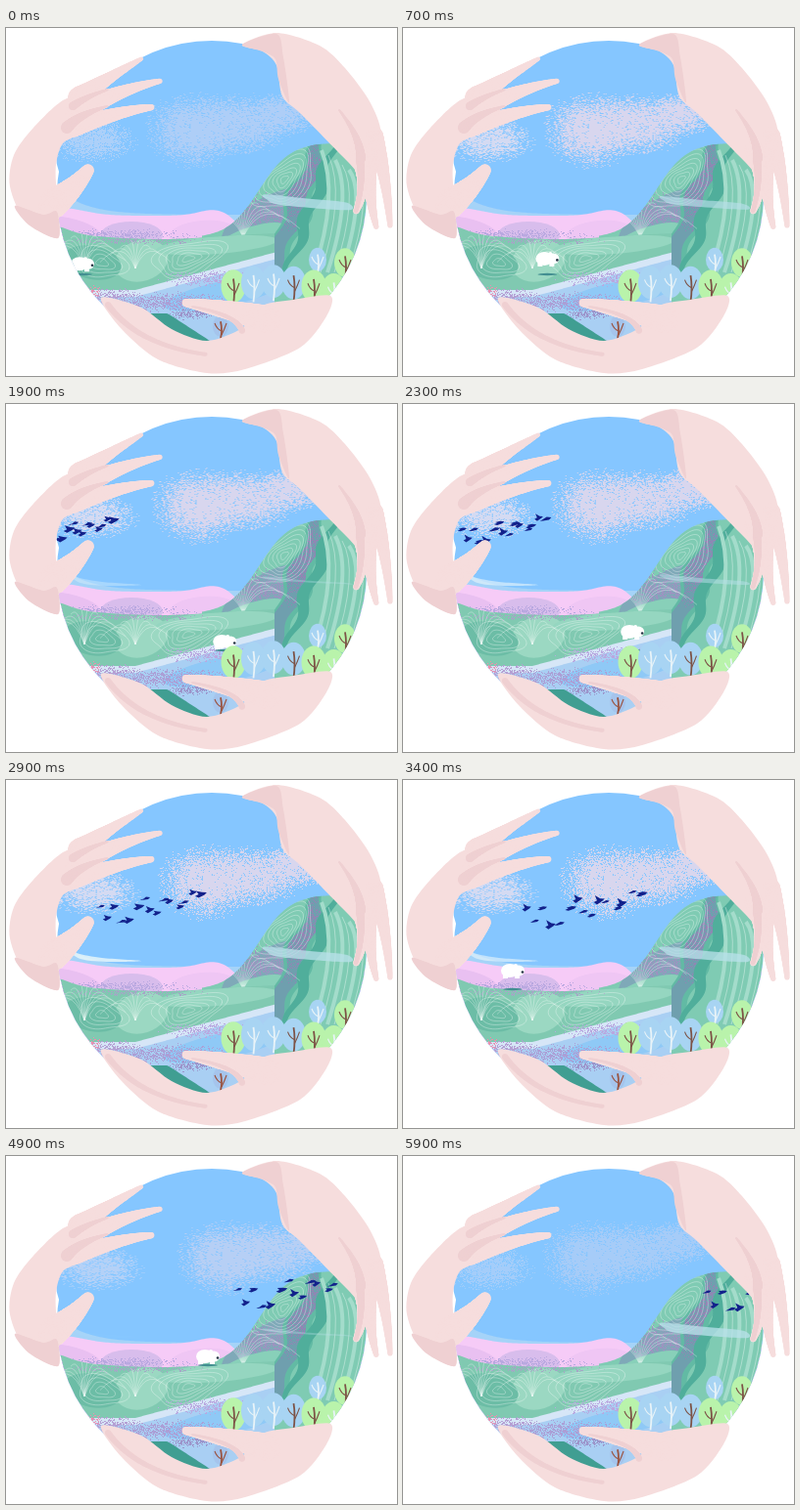
Write an HTML page with a canvas that moves like this. It is 399 px wide and 356 px high and loops after 6 s.

```html
<!DOCTYPE html>
<html lang="en">
<head>
<meta charset="utf-8">
<title>Hands around a landscape</title>
<style>
html, body { margin: 0; width: 100%; height: 100%; overflow: hidden; background: #fff; }
canvas { display: block; }
</style>
</head>
<body>
<canvas id="stage" width="399" height="356"></canvas>
<script>
const W = 399, H = 356, LOOP = 6000, STEP = 100, TAU = Math.PI * 2;
const SKIN = '#f6dddd', SHADE = '#efd0d2';
const { sin, cos, exp, max, min, sqrt, PI } = Math;
const ctx = document.getElementById('stage').getContext('2d');

let seed = 7;
const rand = () => (seed = (seed * 16807) % 2147483647) / 2147483647;
const bump = (x, center, width) => exp(-(((x - center) / width) ** 2));

function layer(paint) {
  const c = document.createElement('canvas');
  c.width = W;
  c.height = H;
  paint(c.getContext('2d'));
  return c;
}

// Smooth closed shape through a few x, y pairs
function blob(g, color, ...p) {
  const n = p.length / 2;
  const at = i => { const k = (i + n) % n * 2; return [p[k], p[k + 1]]; };
  g.fillStyle = color;
  g.beginPath();
  g.moveTo(p[0], p[1]);
  for (let i = 0; i < n; i++) {
    const [a, b, c, d] = [at(i - 1), at(i), at(i + 1), at(i + 2)], s = 7;
    g.bezierCurveTo(b[0] + (c[0] - a[0]) / s, b[1] + (c[1] - a[1]) / s,
      c[0] - (d[0] - b[0]) / s, c[1] - (d[1] - b[1]) / s, c[0], c[1]);
  }
  g.fill();
}

function oval(g, color, x, y, rx, ry, tilt = 0) {
  g.fillStyle = color;
  g.beginPath();
  g.ellipse(x, y, rx, ry, tilt, 0, TAU);
  g.fill();
}

// Ground below a skyline function
function ground(g, color, top, from = 40, to = 380) {
  const path = new Path2D();
  path.moveTo(from, H);
  for (let x = from; x <= to; x += 2) path.lineTo(x, top(x));
  path.lineTo(to, H);
  g.fillStyle = color;
  g.fill(path);
  return path;
}

// Rounded stroke along a curve that narrows from one radius to another
function taper(g, color, x0, y0, cx, cy, x1, y1, r0, r1) {
  for (let k = 0; k <= 1; k += 0.01) {
    const j = 1 - k, r = r0 + (r1 - r0) * k;
    oval(g, color, j * j * x0 + 2 * j * k * cx + k * k * x1, j * j * y0 + 2 * j * k * cy + k * k * y1, r, r);
  }
}

function within(g, path, paint) {
  g.save();
  g.clip(path);
  paint();
  g.restore();
}

function grain(g, color, cx, cy, rx, ry, amount) {
  g.fillStyle = color;
  for (let i = rx * ry * PI * amount; i > 0; i--) {
    const a = rand() * TAU, r = sqrt(rand()) * (0.4 + rand() * 0.75);
    g.fillRect(Math.round(cx + cos(a) * r * rx), Math.round(cy + sin(a) * r * ry), 1, 1);
  }
}

function line(g, color, width, x0, y0, cx, cy, x1, y1) {
  g.strokeStyle = color;
  g.lineWidth = width;
  g.beginPath();
  g.moveTo(x0, y0);
  g.quadraticCurveTo(cx, cy, x1, y1);
  g.stroke();
}

function rings(g, cx, cy, rx, ry, count, tilt) {
  g.strokeStyle = 'rgba(255,255,255,.4)';
  g.lineWidth = 0.8;
  for (let i = 1; i <= count; i++) {
    g.beginPath();
    for (let a = 0; a <= TAU + 0.1; a += 0.1) {
      const r = i / count * (1 + 0.14 * sin(a * 3 + i * 0.4));
      const x = cos(a) * rx * r, y = sin(a) * ry * r;
      g.lineTo(cx + x * cos(tilt) - y * sin(tilt), cy + x * sin(tilt) + y * cos(tilt));
    }
    g.stroke();
  }
}

// Grass arcs that spread from one foot
function fan(g, x, y, reach, height, count) {
  for (let i = 0; i < count; i++) {
    const k = i / (count - 1) * 2 - 1;
    line(g, 'rgba(255,255,255,.38)', 0.8, x, y, x + k * reach * 0.35, y - height,
      x + k * reach, y - height * (1 - Math.abs(k) * 0.8));
  }
}

const globe = new Path2D();
globe.arc(210, 171, 158, 0, TAU);
globe.ellipse(92, 130, 41, 45, 0, 0, TAU);

const pinkTop = x => 192 - 6 * bump(x, 212, 22) - 8 * bump(x, 55, 35) + 25 * bump(x, 255, 20);
const mountainTop = x => 215 - 98 / (1 + exp((258 - x) / 16)) + max(0, x - 328) ** 2 * 0.02;
const fieldTop = x => 213 + 3 * sin((x - 90) / 42) - 9 * bump(x, 44, 25);
const bankTop = x => 268 - 0.27 * max(0, x - 132);

const back = layer(g => {
  g.fillStyle = '#85c6ff';
  g.fill(globe);
  g.clip(globe);
  ground(g, '#a5d3f8', x => 191 - 30 * exp((50 - x) / 28));
  const pink = ground(g, '#f6cbf7', pinkTop);
  within(g, pink, () => {
    oval(g, '#e9c0f1', 62, 207, 36, 13, 0.2);
    oval(g, '#d8bdec', 128, 212, 32, 14);
    oval(g, '#efc6f4', 200, 210, 34, 13, -0.1);
    grain(g, '#b9a8e0', 110, 212, 80, 7, 0.3);
  });
});

// Winding rock strip that runs down the mountain
function strip(g, color, shift, width, lean) {
  const path = new Path2D();
  const edge = (y, side) => 324 + shift - (y - 117) * lean + 4 * sin(y / 8 + shift) + side * width * sin((y - 95) / 55);
  for (let y = 117; y <= 250; y += 2) path.lineTo(edge(y, -0.5), y);
  for (let y = 250; y >= 117; y -= 2) path.lineTo(edge(y, 0.5), y);
  g.fillStyle = color;
  g.fill(path);
  return path;
}

function paintMountain(g) {
  const hill = ground(g, '#7fcbb3', mountainTop, 200);
  within(g, hill, () => {
    oval(g, '#7fa9b8', 262, 193, 48, 17, -0.55);
    grain(g, '#9b94c0', 268, 190, 42, 20, 0.35);
    oval(g, '#88d0b9', 252, 214, 36, 11, -0.3);
    strip(g, '#62baa4', -4, 30, 0.34);
    within(g, strip(g, '#6f9fae', -4, 20, 0.36), () => grain(g, '#9384b4', 305, 160, 34, 55, 0.3));
    strip(g, '#50ae9b', 12, 13, 0.37);
    for (let i = 0; i < 7; i++) {
      const x = 322 + i * 7;
      line(g, i % 2 ? 'rgba(255,255,255,.45)' : '#a4dccb', i % 2 ? 0.8 : 4, x, 125 + i * 5, x + 18, 170, x - 8, 250);
    }
    rings(g, 284, 155, 38, 22, 8, -0.8);
    fan(g, 242, 214, 58, 43, 12);
  });
}

function paintMeadow(g) {
  const field = ground(g, '#80c9b1', fieldTop, 40, 274);
  within(g, field, () => {
    oval(g, '#9bd8c2', 138, 238, 28, 21, -0.3);
    oval(g, '#95d6c0', 215, 222, 62, 9, -0.08);
    oval(g, '#6cbda6', 88, 240, 30, 17, 0.2);
    grain(g, '#a5a6c6', 130, 217, 80, 4, 0.25);
    rings(g, 186, 236, 38, 17, 6, -0.25);
    rings(g, 98, 240, 25, 15, 4, 0.2);
    fan(g, 80, 246, 42, 42, 10);
    fan(g, 132, 246, 36, 32, 8);
  });
  ground(g, '#d6e6f7', bankTop, 72, 274);
  ground(g, '#a9cff3', x => bankTop(x) + 7, 80, 274);
  oval(g, '#8fc9f6', 222, 272, 62, 13, -0.2);
  grain(g, '#b9a8e0', 210, 256, 55, 9, 0.3);
  grain(g, '#ab9fd6', 165, 280, 70, 10, 0.4);
  grain(g, '#b5a0d4', 105, 274, 30, 9, 0.3);
  grain(g, '#ed8fae', 88, 269, 9, 7, 0.3);
  ground(g, '#409e92', x => 292 + max(0, x - 165) * 0.65, 140, 212);
  grain(g, '#9c95cb', 190, 292, 26, 6, 0.45);
}

const land = layer(g => {
  g.clip(globe);
  paintMountain(g);
  paintMeadow(g);
});

function tree(g, x, y, r, crown, trunk) {
  oval(g, crown, x, y, r, r * 1.35);
  line(g, trunk, 1.8, x, y + r * 1.6, x + 2, y + 4, x, y - r * 0.6);
  for (const side of [-1, 1]) {
    line(g, trunk, 1.1, x + 1, y + 7 + side * 2, x + side * 4, y + 3, x + side * 6, y - 3);
  }
}

const trees = layer(g => {
  g.clip(globe);
  const blue = '#a8d4f3', green = '#b9f3ab', brown = '#7d5347', white = '#e8f3f8';
  tree(g, 318, 237, 9, blue, white);
  tree(g, 346, 240, 11, green, brown);
  for (let i = 0; i < 6; i++) {
    const leafy = i === 0 || i > 3;
    tree(g, 232 + i * 20.5, 264 - 5 * sin(i * 0.8), 12.5, leafy ? green : blue, i % 4 === 1 || i === 2 ? white : brown);
  }
  tree(g, 219, 305, 8, '#a5c4ec', '#9a5340');
});

const hands = layer(g => {
  // Left
  blob(g, SKIN, 62, 72, 28, 102, 8, 130, 4, 162, 20, 198, 53, 215, 52, 190, 60, 178, 52, 165, 51, 140, 58, 118, 78, 106, 98, 75);
  taper(g, SKIN, 75, 72, 89, 60, 139, 31, 12, 2);
  taper(g, SKIN, 72, 88, 108, 65, 158, 54, 12, 2.5);
  taper(g, SKIN, 68, 102, 115, 85, 149, 81, 10, 3);
  taper(g, SKIN, 48, 180, 70, 164, 84, 145, 15, 6);
  blob(g, SHADE, 9, 182, 38, 191, 52, 188, 53, 215, 24, 202);
  taper(g, SHADE, 62, 102, 75, 88, 104, 80, 6, 1);
  taper(g, SHADE, 68, 80, 82, 70, 104, 63, 4, 1);

  // Right
  blob(g, SKIN, 241, 17, 276, 5, 320, 18, 346, 41, 371, 75, 383, 108, 378, 150, 362, 150, 347, 135, 301, 88, 282, 70, 276, 38, 262, 24);
  taper(g, SKIN, 376, 110, 388, 150, 392, 203, 9, 2.5);
  taper(g, SKIN, 371, 130, 369, 170, 378, 204, 9, 2.5);
  taper(g, SKIN, 358, 125, 372, 154, 357, 188, 10, 3);
  blob(g, SHADE, 241, 17, 276, 6, 283, 30, 289, 76, 278, 52, 275, 32, 262, 24);
  taper(g, SHADE, 340, 84, 362, 112, 362, 134, 1, 5);
  taper(g, SHADE, 361, 134, 365, 160, 357, 188, 4, 2);

  // Below
  blob(g, SKIN, 97, 276, 138, 286, 169, 308, 205, 320, 241, 307, 262, 284, 293, 278, 331, 274, 327, 295, 300, 327, 244, 349, 205, 353, 155, 339, 118, 308);
  taper(g, SKIN, 268, 298, 218, 286, 183, 281, 14, 4);
  taper(g, SHADE, 104, 283, 135, 325, 205, 334, 3, 2);
  taper(g, SHADE, 190, 285, 235, 293, 241, 310, 1, 3);
});

const bigCloud = layer(g => {
  const color = '#d8d6ee';
  grain(g, color, 190, 104, 44, 36, 1.1);
  grain(g, color, 235, 98, 52, 29, 1);
  grain(g, color, 284, 87, 34, 21, 1);
});
const smallCloud = layer(g => grain(g, '#d4daf2', 86, 114, 44, 22, 0.9));

const flock = Array.from({ length: 15 }, (_, i) => {
  const x = -55 + i * 8 + rand() * 6;
  return { x, y: -x * 0.17 + (rand() - 0.5) * 24, size: 0.85 + rand() * 0.35 };
});

function drawClouds(t) {
  const p = (t + 500) % LOOP / LOOP, x = 40 * p * p;
  ctx.globalAlpha = min(1, 1.9 * sin(PI * p));
  ctx.drawImage(bigCloud, x, 0);
  ctx.drawImage(smallCloud, x * 0.2, 0);
  ctx.globalAlpha = 1;
}

// The body hops while its shadow stays on the ground
function drawAnimal(x, y, t, limit) {
  const hop = 10 * max(0, cos(TAU * (t - 2300) / 550)) ** 2;
  const path = new Path2D();
  path.rect(0, 0, limit, H);
  within(ctx, path, () => {
    ctx.translate(x, y);
    oval(ctx, '#438f91', 0, 7, 10, 1.2);
    ctx.translate(0, -hop);
    oval(ctx, '#fff', -3, -2, 9, 7);
    oval(ctx, '#fff', 6, -2, 6, 5.5);
    oval(ctx, '#fff', 3, -7, 2, 2);
    ctx.fillRect(-10, 0, 5, 6);
    ctx.fillRect(2, 0, 5, 6);
    oval(ctx, '#263545', 10, -0.5, 1.3, 1.3);
  });
}

function drawNearAnimal(t) {
  if (t < 2500) drawAnimal(78 + 158 * (1 - (1 - t / 2500) ** 1.76), 245, t, 262);
}

function drawFarAnimal(t) {
  if (t >= 3000 && t < 5500) drawAnimal(100 + 106 * ((t - 3000) / 1900) ** 1.4, 207, t, 224);
}

function drawBirds(t) {
  const cx = 100 + (t - 2300) * 0.0735;
  const spread = min(1, 0.5 + max(0, t - 1400) / 4000);
  flock.forEach(({ x, y, size }, i) => {
    const flap = 3.5 * sin(t / 100 * 1.9 + i * 2.1);
    ctx.save();
    ctx.translate(cx + x * spread, 134 + 6 * cos(t / 1500 + 2) + y * spread);
    ctx.scale(size, size);
    ctx.fillStyle = '#12218b';
    ctx.beginPath();
    ctx.moveTo(5, -1);
    ctx.lineTo(1, -1.4);
    ctx.lineTo(-4, -1 - flap);
    ctx.lineTo(-2, 0.5);
    ctx.lineTo(-5, 2);
    ctx.lineTo(-2, 3 + flap * 0.4);
    ctx.lineTo(3, 1);
    ctx.fill();
    ctx.restore();
  });
}

function drawStreak(t) {
  blob(ctx, `rgba(231,246,250,${0.85 * bump(t, 2850, 1000)})`, 55, 168, 72, 177, 98, 182, 138, 185, 106, 186, 76, 183);
}

function drawLens(t) {
  const wave = cos(TAU * t / 3000 - 0.3), h = 4.5 + 3.5 * wave;
  blob(ctx, `rgba(185,225,235,${0.55 + 0.25 * wave})`,
    264, 178 - h, 305, 182 - h, 347, 184 - h * 0.7, 349, 184 + h * 0.3, 280, 181, 266, 180 - h * 0.6);
}

function draw() {
  const t = Math.floor(performance.now() % LOOP / STEP) * STEP;
  ctx.fillStyle = '#fff';
  ctx.fillRect(0, 0, W, H);
  ctx.drawImage(back, 0, 0);
  within(ctx, globe, () => {
    drawClouds(t);
    drawStreak(t);
    ctx.drawImage(land, 0, 0);
    drawFarAnimal(t);
    drawNearAnimal(t);
    drawLens(t);
    drawBirds(t);
  });
  ctx.drawImage(trees, 0, 0);
  ctx.drawImage(hands, 0, 0);
  requestAnimationFrame(draw);
}

draw();
</script>
</body>
</html>
```
